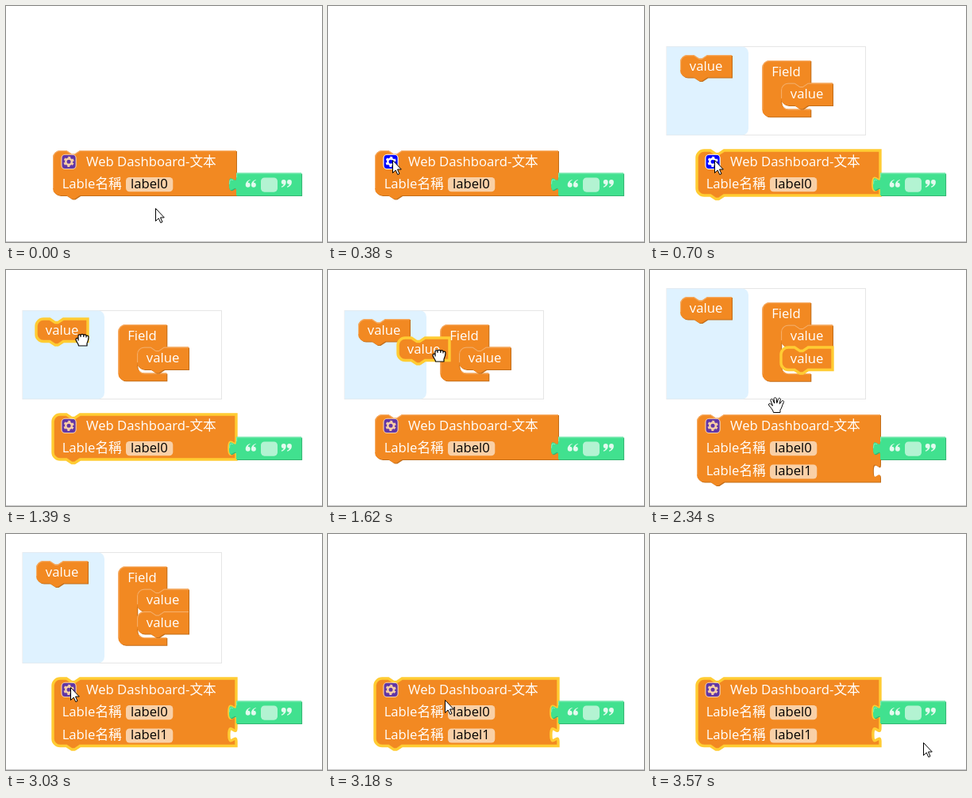
Write an HTML page that moves like this. It is 398x299 px and loops after 3.65 s.

```html
<!DOCTYPE html>
<html lang="zh">
<head>
<meta charset="utf-8">
<title>Block mutator</title>
<style>
html, body { margin: 0; width: 100%; height: 100%; overflow: hidden; background: #fff; }
svg { display: block; width: 100vw; height: 100vh; }
text { font: 500 14.65px 'Open Sans', 'Noto Sans', 'Noto Sans CJK TC', 'Noto Sans CJK SC', 'Noto Sans CJK', sans-serif; fill: #fff; }
text.dark { font-weight: 400; fill: #000; }
</style>
</head>
<body>
<svg id="stage" viewBox="0 0 398 299"></svg>
<script>
const LOOP = 3650, STEPS = 47, SCALE = 1.14;
const ORANGE = { fill: '#f28922', dark: '#c26e1b', light: '#f6ac64' };
const GREEN = { fill: '#41e18f', dark: '#34b472', light: '#7aeab1' };
const NOTCH = 'l6,4 3,0 6,-4', TAB = 'l-6,4 -3,0 -6,-4';
const SOCKET = 'v5 c0,10 -8,-8 -8,7.5 s8,-2.5 8,7.5 v5 ';
const TOP_LEFT = 'A8,8 0 0 1 8,0', BOTTOM_LEFT = 'H8 a8,8 0 0 1 -8,-8';

// Pointer path: step, x, y
const POINTER = [
  [0, 189, 256], [5, 82, 195], [9, 82, 195], [15, 97, 86], [18, 96, 88],
  [25, 208, 139], [26, 208, 139], [28, 202, 151], [30, 159, 171],
  [35, 95, 191], [36, 84, 195], [37, 82, 194], [39, 82, 194],
  [45, 338, 257], [46, 345, 264]
];
const DRAG = [[18, 38, 62], [25, 164, 124]];

function at(keys, n) {
  const i = keys.findIndex(k => k[0] >= n);
  if (i < 0) return keys[keys.length - 1].slice(1);
  if (i === 0) return keys[0].slice(1);
  const [a, b] = [keys[i - 1], keys[i]];
  const u = (n - a[0]) / (b[0] - a[0]), e = u * u * (3 - 2 * u);
  return [1, 2].map(k => Math.round(a[k] + (b[k] - a[k]) * e));
}

const text = (x, y, s, cls = '') => `<text x="${x}" y="${y}" class="${cls}">${s}</text>`;
const box = (x, y, w) =>
  `<rect x="${x}" y="${y}" width="${w}" height="16" rx="4" fill="#fff" opacity=".6"/>`;

function block(x, y, path, lightPath, color, inner, selected) {
  const edge = selected ? 'stroke="#fc3" stroke-width="3"' : '';
  const light = selected ? '' :
    `<path d="${lightPath}" fill="none" stroke="${color.light}"/>`;
  return `<g transform="translate(${x} ${y}) scale(${SCALE})">
    <path d="${path}" fill="${color.dark}" transform="translate(.9 .9)"/>
    <path d="${path}" fill="${color.fill}" ${edge}/>${light}${inner}</g>`;
}

const rim = (w, h, notch) =>
  `M.5,${h - 8} V8 A7.5,7.5 0 0 1 8,.5 ${notch ? 'H15 ' + NOTCH : ''} H${w}`;

function valueBlock(x, y, selected) {
  const path = `M0,8 ${TOP_LEFT} H15 ${NOTCH} H57 V25 H30 ${TAB} ${BOTTOM_LEFT} Z`;
  return block(x, y, path, rim(57, 25, true), ORANGE, text(10.4, 17.5, 'value'), selected);
}

function fieldBlock(x, y, count) {
  const w = 53.5, foot = 29 + 25 * count, h = foot + 8.5;
  const path = `M0,8 ${TOP_LEFT} H${w} V25 H51 ${TAB} h-7 a8,8 0 0 0 -8,8
    V${foot - 8} a8,8 0 0 0 8,8 H${w} V${h} ${BOTTOM_LEFT} Z`;
  const light = rim(w, h) + ` M23.5,${foot - 2} a8,8 0 0 0 5.5,2.5 H${w}`;
  return block(x, y, path, light, ORANGE, text(10.4, 17.5, 'Field'));
}

function gear(hover) {
  return `<g transform="translate(17.6 12.6)" opacity="${hover ? 1 : .6}">
    <rect x="-8" y="-8" width="16" height="16" rx="4" fill="#00f" stroke="#fff"/>
    <g fill="none" stroke="#fff">
      <circle r="3.3" stroke-width="2.2"/>
      <circle r="4.9" stroke-width="1.8" stroke-dasharray="2.565" transform="rotate(15)"/>
    </g></g>`;
}

function mainBlock(rows, selected, hover) {
  const w = 202.6, h = 25 + 25 * rows;
  const path = `M0,8 ${TOP_LEFT} H15 ${NOTCH} H${w} V25 ${SOCKET.repeat(rows)}
    H30 ${TAB} ${BOTTOM_LEFT} Z`;
  let inner = gear(hover) + text(36.9, 17.5, 'Web Dashboard-文本');
  for (let r = 0; r < rows; r++) {
    const y = 25 + r * 25.8;
    inner += text(10.2, y + 17.1, 'Lable名稱') + box(80.7, y + 4.8, 52) +
      text(85.9, y + 17.1, 'label' + r, 'dark');
  }
  return block(59, 183, path, rim(w, h, true), ORANGE, inner, selected);
}

function stringBlock() {
  const path = 'M0,0 H72 V25 H0 V20 c0,-10 -8,8 -8,-7.5 s8,2.5 8,-7.5 Z';
  const mark = 'M5,0 C2,.8 0,3 0,6 a2.6,2.6 0 1 0 2.6,-2.6 C2.8,2.4 3.6,1.4 5.2,.8 Z';
  const pair = `<path d="${mark}"/><path d="${mark}" transform="translate(6.3 0)"/>`;
  const inner = `<g fill="#fff" opacity=".85"><g transform="translate(10.3 7.4)">${pair}</g>
    <g transform="translate(61.3 16) rotate(180)">${pair}</g></g>` + box(27.2, 5.2, 18.4);
  const light = 'M72,.5 H.5 V5 M-7.5,12.5 c0,-6 2,-5 4,-4.5';
  return block(290, 211.5, path, light, GREEN, inner);
}

function popup(n, grown) {
  const top = grown ? 23.5 : 51.5, h = 163.5 - top;
  let s = `<rect x="21" y="${top}" width="250.5" height="${h}" fill="#fff" stroke="#e6e6e6"/>
    <path d="M21,${top} h95 a8,8 0 0 1 8,8 v${h - 16} a8,8 0 0 1 -8,8 h-95 Z" fill="#dff2ff"/>`;
  s += valueBlock(38, top + 10.5, n === 18);
  s += fieldBlock(141.3, top + 17.5, grown ? 2 : 1) + valueBlock(165, top + 46);
  if (grown) s += valueBlock(165, top + 74.5, n < 39);
  if (n > 18 && !grown) s += valueBlock(...at(DRAG, n), true);
  return s;
}

const CURSORS = {
  arrow: '<path d="M-.5,.5 V16.5 L3.2,13 5.8,18.6 8,17.6 5.5,12 H10.3 Z"/>',
  open: `<path d="M-3.5,9.5 C-4,6 -7.5,3 -9.5,0 C-9.8,-2 -8,-2.4 -6.5,-.8 L-4.5,1 -7,-5.5
    C-7.5,-7.8 -5,-8.3 -4.2,-6.5 L-2.3,-2 -3,-7.5 C-3,-9.8 -.2,-10 .2,-7.8 L.8,-2.5 2.5,-7.5
    C3.2,-9.5 5.7,-8.8 5.3,-6.8 L4.2,-1.5 7,-4.8 C8.4,-6.3 10.2,-5 9.3,-3.2 C7.5,0 7,4 5,6.5 V9.5 Z"/>`,
  fist: `<path d="M-4.5,8 C-4.5,5 -8,3 -8,0 C-8,-2 -6,-2 -5,-1 V-4.5 C-5,-6.3 -2.5,-6.7 -2,-5.2
    C-1.5,-7 1.5,-7 1.8,-5.2 C2.5,-6.6 5,-6.4 5,-4.4 C6.5,-5.4 8,-4.6 8,-3 C8,1 6.5,3 6,5 V8 Z
    M-2,-5.2 V-3 M1.8,-5.2 V-3 M5,-4.4 V-2.5 M-5,-1 V1.5"/>`
};

function cursor(n) {
  const kind = n < 15 || n > 35 ? 'arrow' : n > 17 && n < 27 ? 'fist' : 'open';
  const [x, y] = at(POINTER, n);
  return `<g transform="translate(${x} ${y})" fill="#fff" stroke="#000"
    stroke-width="${kind === 'fist' ? 1.2 : 1}" stroke-linejoin="round">${CURSORS[kind]}</g>`;
}

function scene(n) {
  const grown = n >= 27;
  const selected = (n >= 8 && n <= 18) || n >= 39;
  const hover = (n >= 5 && n <= 9) || (n >= 36 && n <= 38);
  return '<rect width="398" height="299" fill="#fff"/>' +
    '<rect y="298" width="398" height="1" fill="#c8c8c8"/>' +
    mainBlock(grown ? 2 : 1, selected, hover) + stringBlock() +
    (n >= 9 && n < 40 ? popup(n, grown) : '') + cursor(n);
}

const stage = document.getElementById('stage');
const start = performance.now();
let shown = -1;

function tick() {
  const t = (performance.now() - start) % LOOP;
  // The screen refreshes at a fixed rate with a slight lead
  const n = Math.min(STEPS - 1, Math.floor((t + 14) * STEPS / LOOP));
  if (n !== shown) stage.innerHTML = scene(shown = n);
  requestAnimationFrame(tick);
}
tick();
</script>
</body>
</html>
```
